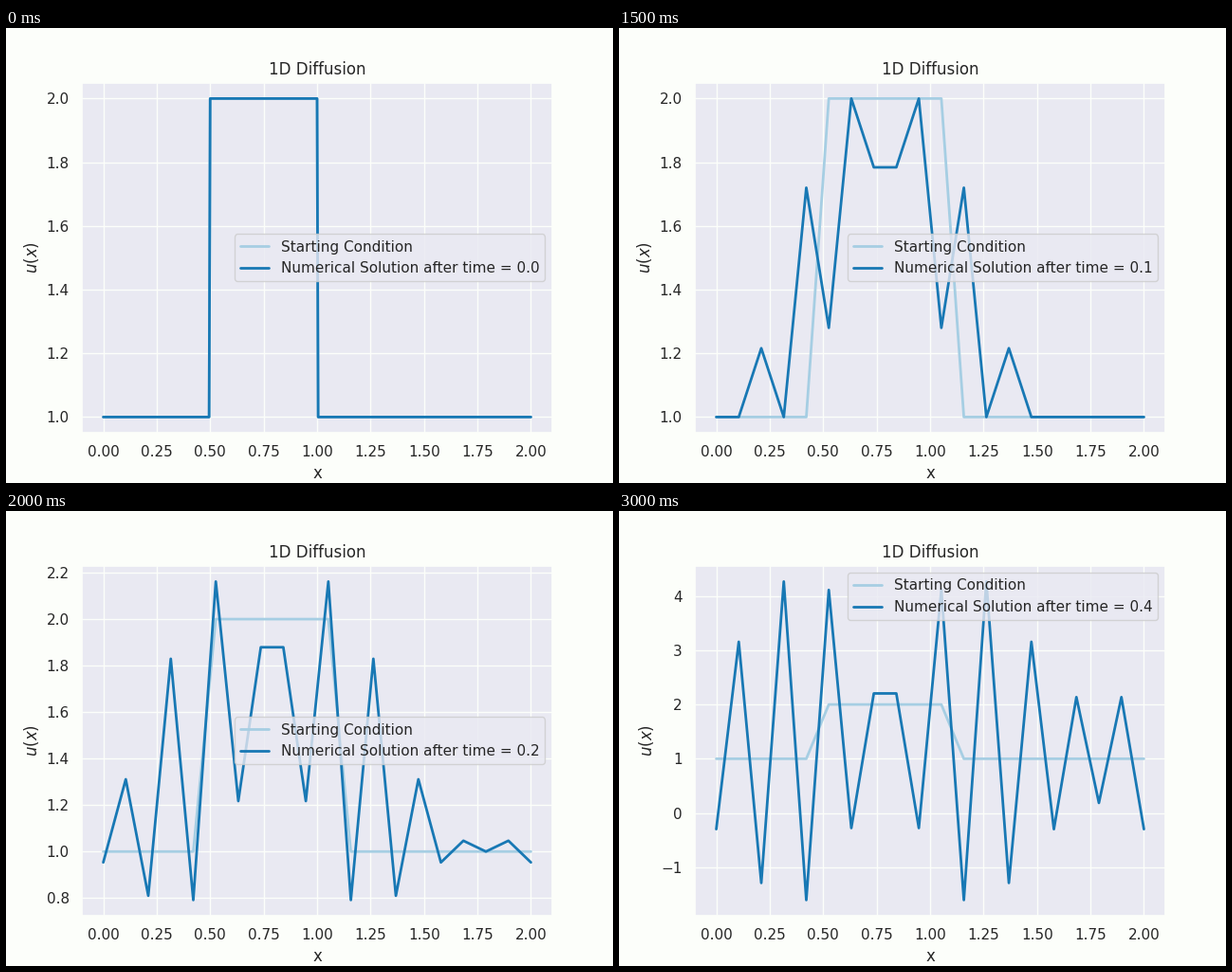
Recreate the animation shown at these times as a matplotlib script. Size 640 by 480 pixels, loop 3.5 s.

```python
import numpy as np
import matplotlib.pyplot as plt
from matplotlib.animation import FuncAnimation

PAPER, PANEL, INK = "#fcfefa", "#e9e9f2", ".15"
LIGHT, DARK = "#a6cee3", "#1878b4"

plt.rcParams.update({
    "font.family": "DejaVu Sans",
    "figure.facecolor": PAPER,
    "axes.facecolor": PANEL, "axes.edgecolor": PAPER, "axes.linewidth": 1.25,
    "axes.grid": True, "axes.axisbelow": True,
    "grid.color": PAPER, "grid.linewidth": 1,
    "text.color": INK, "axes.labelcolor": INK,
    "xtick.color": INK, "ytick.color": INK,
    "axes.titlesize": 12, "axes.labelsize": 12, "legend.fontsize": 11,
    "xtick.labelsize": 11, "ytick.labelsize": 11,
    "xtick.major.size": 6, "ytick.major.size": 6,
    "xtick.bottom": False, "ytick.left": False,
    "lines.linewidth": 2, "lines.solid_capstyle": "round",
})

R = 0.6               # diffusion number, above the stability limit of 0.5
STEPS_PER_FRAME = 3
LEGEND_SPOT = {3: "lower right", 4: "upper right"}


def start(nx):
    """Box profile: u = 2 on roughly [0.5, 1], 1 elsewhere."""
    dx = 2 / (nx - 1)
    u = np.ones(nx)
    u[int(np.ceil(0.5 / dx)):int(np.ceil(1 / dx)) + 1] = 2
    return u


def diffuse(u, steps):
    """Explicit scheme on a periodic domain; both end points coincide."""
    v = u[:-1].copy()
    for _ in range(steps):
        v += R * (np.roll(v, 1) + np.roll(v, -1) - 2 * v)
    return np.append(v, v[0])


fig, ax = plt.subplots(figsize=(6.4, 4.8), dpi=100)


def draw(i):
    # a fine grid is held for two frames, then the coarse grid evolves
    nx, stage = (401, 0) if i < 2 else (20, i - 2)
    x, u0 = np.linspace(0, 2, nx), start(nx)
    ax.clear()
    ax.plot(x, u0, color=LIGHT, label="Starting Condition")
    ax.plot(x, diffuse(u0, STEPS_PER_FRAME * stage), color=DARK,
            label=f"Numerical Solution after time = {stage / 10:.1f}")
    ax.set(title="1D Diffusion", xlabel="x", ylabel="$u(x)$")
    ax.legend(loc=LEGEND_SPOT.get(stage, "center right"))


anim = FuncAnimation(fig, draw, frames=7, init_func=lambda: None,
                     interval=500, repeat=True, repeat_delay=0)
plt.show()
```
